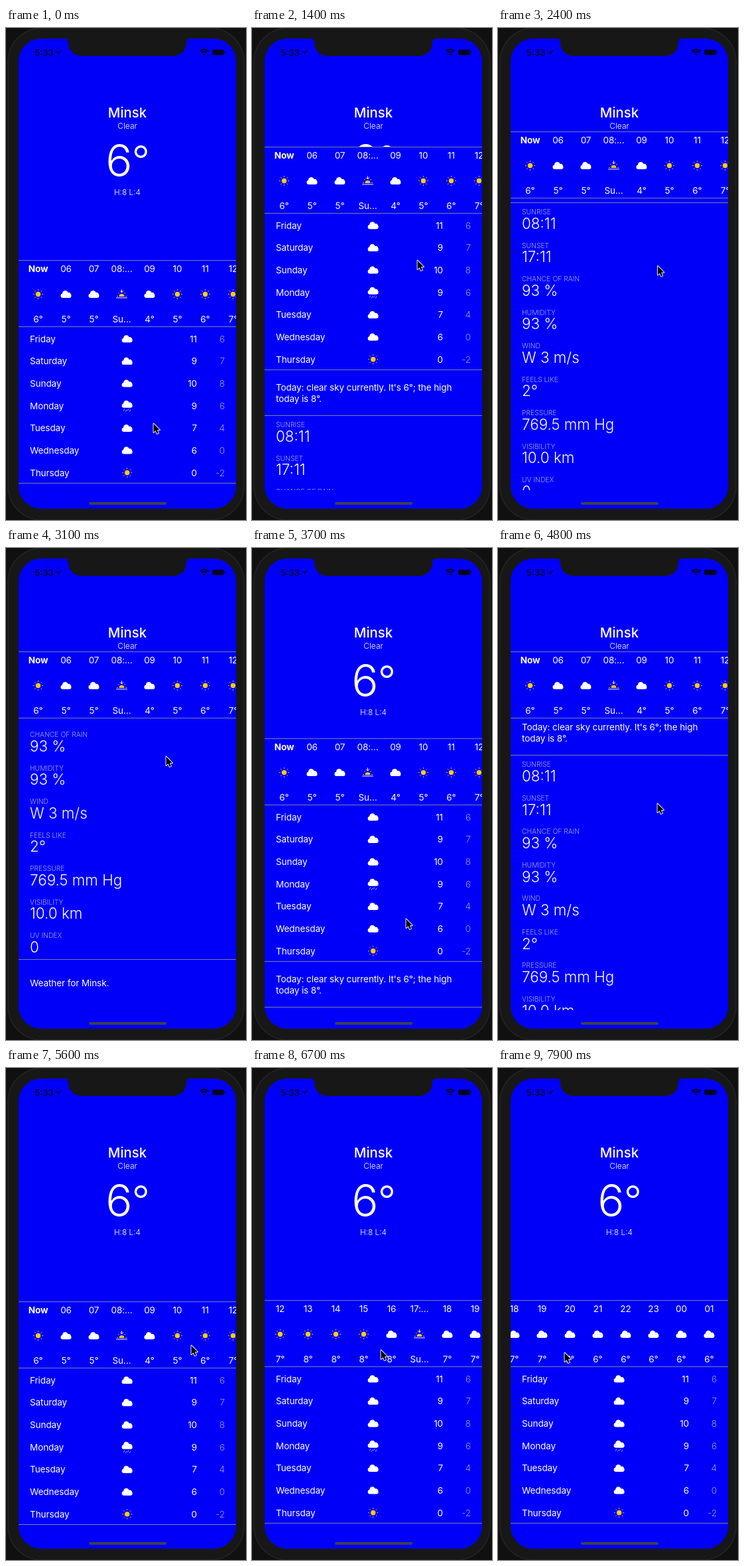
Recreate the animation shown at these times as an HTML page with a canvas. Size 362 by 742 pixels, loop 8000 ms.

```html
<!DOCTYPE html>
<html lang="en">
<head>
<meta charset="utf-8">
<title>Weather</title>
<style>
html, body { margin: 0; width: 100%; height: 100%; overflow: hidden; background: #161616; }
canvas { display: block; width: 362px; height: 742px; }
</style>
</head>
<body>
<canvas id="stage"></canvas>
<script>
const W = 362, H = 742, LOOP = 8000, STEP = 100;
const BLUE = '#0000fa', BEZEL = '#171717', WHITE = '#fff', GREY = '#9c9cbc';
const LINE = '#7c7c9c', SUN = '#ffcc0a', INK = '#050528';
const LEFT = 19, RIGHT = 347, TOP = 16, BOTTOM = 725, LIST_END = 697;
const HEAD_Y = 351, HEAD_MIN = 157, HEAD_H = 100;

const canvas = document.getElementById('stage');
const ctx = canvas.getContext('2d');
const dpr = window.devicePixelRatio || 1;
canvas.width = W * dpr;
canvas.height = H * dpr;

// Eased moves: [start, duration, distance (x), distance y]
const scrollMoves = [[700, 1400, 342], [2000, 700, 247], [3150, 690, -589],
  [4300, 600, 478], [5000, 450, -490], [5450, 205, 12]];
const hourMoves = [[5900, 800, 300], [7000, 800, 270]];
const mouseMoves = [[700, 700, 27, -246], [1500, 500, -11, 170], [2050, 500, 3, -206], [3150, 550, -9, 245],
  [4300, 500, 8, -174], [5000, 300, 0, 170], [5300, 300, 39, -137],
  [5900, 500, -170, 7], [6500, 400, 170, 0], [7000, 450, -179, 4]];

const days = [['Friday', 11, 6], ['Saturday', 9, 7], ['Sunday', 10, 8], ['Monday', 9, 6, rain],
  ['Tuesday', 7, 4], ['Wednesday', 6, 0], ['Thursday', 0, -2, sun]];
const details = [['SUNRISE', '08:11'], ['SUNSET', '17:11'], ['CHANCE OF RAIN', '93 %'], ['HUMIDITY', '93 %'],
  ['WIND', 'W 3 m/s'], ['FEELS LIKE', '2°'], ['PRESSURE', '769.5 mm Hg'], ['VISIBILITY', '10.0 km'], ['UV INDEX', '0']];
const hours = Array.from({ length: 21 }, (_, i) => forecast(i + 5));

function forecast(h) {
  if (h === 5) return { label: 'Now', temp: '6°', icon: sun };
  const label = String(h % 24).padStart(2, '0');
  if (h === 8 || h === 17) return { label: label + ':…', temp: 'Su…', icon: horizon };
  const temp = h < 9 ? 5 : Math.min(h - 5, 8, Math.max(6, Math.round(11.7 - h / 4)));
  return { label, temp: temp + '°', icon: h > 9 && h < 16 ? sun : cloud };
}

function travel(moves, t, axis = 2) {
  return moves.reduce((sum, move) => {
    const u = Math.min(1, Math.max(0, (t - move[0]) / move[1]));
    return sum + move[axis] * u * u * (3 - 2 * u);
  }, 0);
}

function text(str, x, mid, size, { align = 'left', weight = 400, color = WHITE, gap = 0 } = {}) {
  ctx.font = `${weight} ${size}px Inter, Roboto, sans-serif`;
  ctx.letterSpacing = gap + 'px';
  ctx.textAlign = align;
  ctx.fillStyle = color;
  ctx.fillText(str, x, mid + size * 0.364);
}

const body = (str, x, mid, opts) => text(str, x, mid - 0.3, 13.6, { gap: -0.13, ...opts });
const center = (str, mid, size, weight) => text(str, 183, mid, size, { align: 'center', weight });

function rule(y) {
  ctx.fillStyle = LINE;
  ctx.fillRect(LEFT, Math.round(y) - 1, RIGHT - LEFT, 1);
}

function box(x, y, w, h, r, color) {
  ctx.fillStyle = color;
  ctx.beginPath();
  ctx.roundRect(x, y, w, h, r);
  ctx.fill();
}

function disc(x, y, r, color, from = 0) {
  ctx.fillStyle = color;
  ctx.beginPath();
  ctx.arc(x, y, r, from, Math.PI * 2);
  ctx.fill();
}

function path(points) {
  ctx.beginPath();
  points.forEach(p => ctx.lineTo(...p));
}

function stroke(points, color, width) {
  path(points);
  ctx.strokeStyle = color;
  ctx.lineWidth = width;
  ctx.lineCap = 'round';
  ctx.stroke();
}

function clipped(y, h, draw) {
  if (h <= 0) return;
  ctx.save();
  ctx.beginPath();
  ctx.rect(LEFT, y, RIGHT - LEFT, h);
  ctx.clip();
  draw();
  ctx.restore();
}

function rays(x, y, count, step) {
  for (let i = 0; i < count; i++) {
    const c = Math.cos(i * step), s = Math.sin(i * step);
    stroke([[x + c * 6, y - s * 6], [x + c * 7.1, y - s * 7.1]], SUN, 1);
  }
}

function sun(x, y) {
  disc(x, y, 3.7, SUN);
  rays(x, y, 8, Math.PI / 4);
}

function cloud(x, y) {
  box(x - 8, y - 1, 16, 6.5, 3.2, WHITE);
  disc(x - 1.2, y - 1.2, 4.3, WHITE);
  disc(x + 3.8, y + 0.6, 3.3, WHITE);
}

function rain(x, y) {
  cloud(x, y - 2.5);
  for (let i = 0; i < 4; i++) {
    const dx = x - 4 + i * 3, dy = y + 5 + (i % 2) * 1.2;
    stroke([[dx, dy], [dx - 1.2, dy + 2.4]], '#b4c0ff', 0.9);
  }
}

function horizon(x, y) {
  disc(x, y + 3.6, 4, SUN, Math.PI);
  rays(x, y + 3, 5, Math.PI / 4);
  stroke([[x - 8, y + 5.4], [x + 8, y + 5.4]], WHITE, 1);
  stroke([[x, y - 7], [x, y - 2.8]], WHITE, 1);
  stroke([[x - 2.2, y - 4.8], [x, y - 2.6], [x + 2.2, y - 4.8]], WHITE, 1);
}

function city(head) {
  center('Minsk', 127.3, 20.4, 450);
  center('Clear', 147.3, 12.1, 300);
  clipped(TOP, head - TOP, () => {
    text('6', 170.5, 200, 67, { align: 'center', weight: 300 });
    text('°', 203.5, 199.5, 60, { align: 'center', weight: 300 });
    center('H:8 L:4', 247.3, 11.8, 300);
  });
}

function hourly(head, shift) {
  rule(head);
  rule(head + HEAD_H);
  clipped(head, HEAD_H, () => hours.forEach(({ label, temp, icon }, i) => {
    const x = 48.5 + i * 42 - shift;
    body(label, x, head + 12.5, { align: 'center', weight: i ? 400 : 700 });
    icon(x, head + 50.5);
    body(temp, x, head + 88.5, { align: 'center' });
  }));
}

function list(head, scroll) {
  const y0 = HEAD_Y + HEAD_H - scroll, top = head + HEAD_H;
  clipped(top, LIST_END - top, () => {
    days.forEach(([name, high, low, icon = cloud], i) => {
      const y = y0 + 18 + i * 33.67;
      body(name, 36, y);
      icon(182.7, y - 0.3);
      body(high, 288, y, { align: 'right' });
      body(low, 330, y, { align: 'right', color: GREY, weight: 300 });
    });
    rule(y0 + 236);
    body("Today: clear sky currently. It's 6°; the high", 36, y0 + 262);
    body('today is 8°.', 36, y0 + 279);
    rule(y0 + 304.5);
    details.forEach(([label, value], i) => {
      const y = y0 + 318.3 + i * 50.5;
      text(label, 36, y, 10.3, { color: '#a8a8d0', weight: 300 });
      text(value, 36, y + 17.2, 22.4, { weight: 350 });
    });
    rule(y0 + 759);
    body('Weather for Minsk.', 36, y0 + 794);
  });
}

function phone() {
  ctx.fillStyle = '#101010';
  ctx.fillRect(0, 0, W, H);
  box(2, -1, 358, 744, 52, '#212121');
  box(4, 1, 354, 740, 50, BEZEL);
  box(LEFT, TOP, RIGHT - LEFT, BOTTOM - TOP, 34, BLUE);
}

function notch() {
  ctx.fillStyle = BEZEL;
  ctx.beginPath();
  ctx.moveTo(88, TOP - 1);
  ctx.quadraticCurveTo(94, TOP, 94, 23);
  ctx.arcTo(94, 42, 113, 42, 19);
  ctx.arcTo(272, 42, 272, 23, 19);
  ctx.quadraticCurveTo(272, TOP, 278, TOP - 1);
  ctx.fill();
}

function status() {
  text('5:33', 43, 37, 13, { weight: 600, color: INK });
  path([[75, 37], [83, 33], [79.5, 41], [79, 37.3]]);
  ctx.fill();
  ctx.strokeStyle = INK;
  ctx.lineWidth = 2;
  ctx.lineCap = 'butt';
  for (const r of [9.2, 6]) {
    ctx.beginPath();
    ctx.arc(299, 41.5, r, -Math.PI * 0.76, -Math.PI * 0.24);
    ctx.stroke();
  }
  disc(299, 39.8, 1.8, INK);
  box(311, 32.5, 18, 8.5, 2.5, INK);
  box(330, 35, 1.2, 3.5, 0.6, INK);
  box(125, 715, 117, 4, 2, '#40404c');
}

function pointer(x, y) {
  ctx.save();
  ctx.translate(x, y);
  path([[0.5, 0.5], [0.5, 14], [3.6, 11.2], [5.8, 16], [8, 15], [6, 10.3], [10, 10.1]]);
  ctx.closePath();
  ctx.lineJoin = 'round';
  ctx.lineWidth = 1.8;
  ctx.strokeStyle = WHITE;
  ctx.stroke();
  ctx.fillStyle = '#000';
  ctx.fill();
  ctx.restore();
}

function draw(t) {
  const scroll = travel(scrollMoves, t);
  const head = Math.max(HEAD_MIN, HEAD_Y - scroll);
  ctx.setTransform(dpr, 0, 0, dpr, 0, 0);
  phone();
  city(head);
  list(head, scroll);
  hourly(head, travel(hourMoves, t));
  notch();
  status();
  pointer(222 + travel(mouseMoves, t, 2), 596 + travel(mouseMoves, t, 3));
}

const start = performance.now();
function tick(now) {
  const t = Math.max(0, now - start) % LOOP;
  draw(Math.floor(t / STEP) * STEP);
  requestAnimationFrame(tick);
}
draw(0);
requestAnimationFrame(tick);
</script>
</body>
</html>
```
